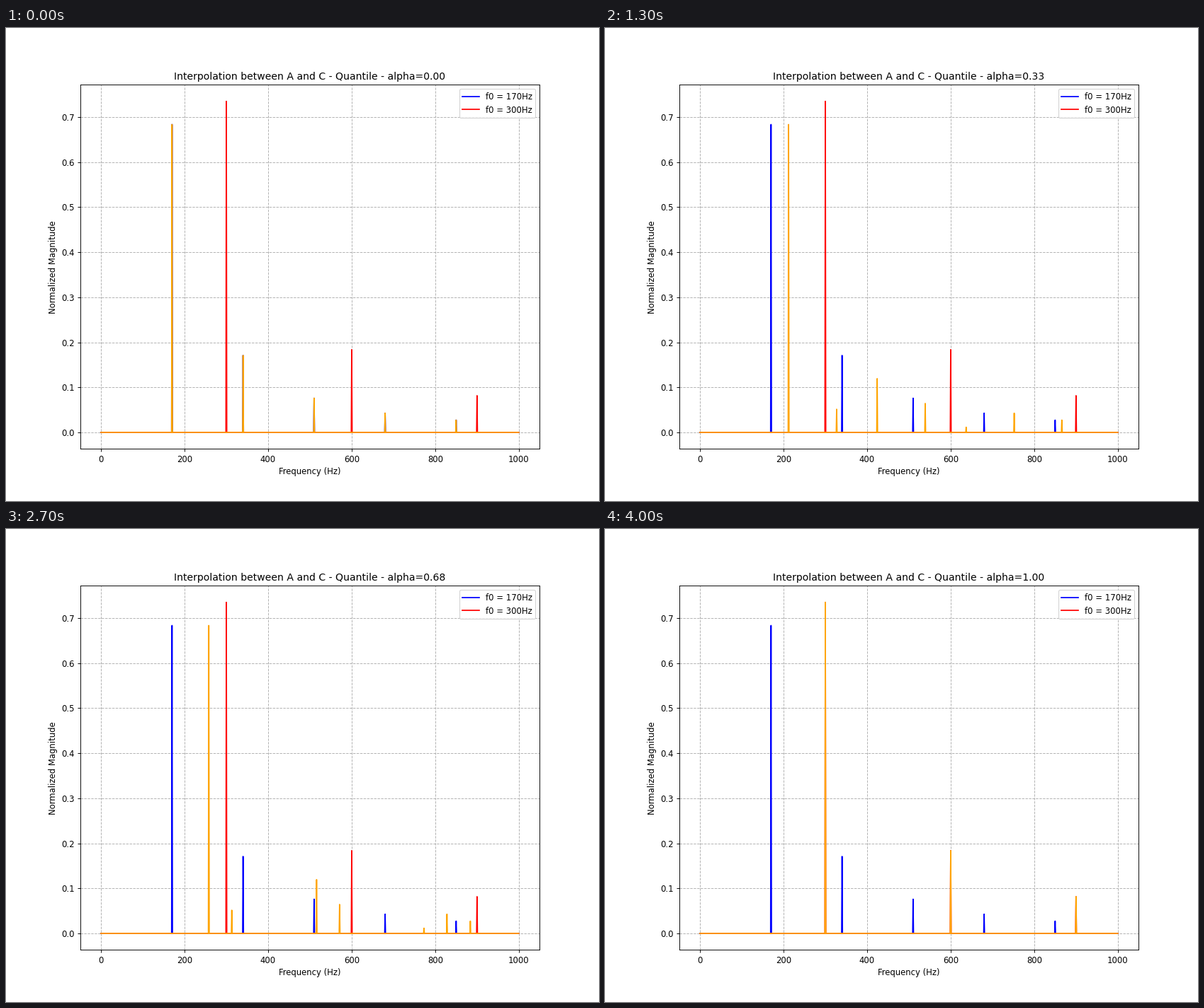
A matplotlib script that plays this animation: 837x669 px, repeating every 4100 ms.

```python
import numpy as np
import matplotlib.pyplot as plt
from matplotlib.animation import FuncAnimation

FRAMES = 41
INTERVAL = 100
WIDTH, HEIGHT, DPI = 837, 669, 83.7
F_MAX = 1000

freqs = np.arange(F_MAX + 1)


def harmonics(f0):
    """Harmonic frequencies up to F_MAX with normalized 1/k^2 weights."""
    k = np.arange(1, F_MAX // f0 + 1)
    weights = 1 / k**2
    return k * f0, weights / weights.sum()


def spectrum(positions, masses):
    values = np.zeros(len(freqs))
    np.add.at(values, np.rint(positions).astype(int), masses)
    return values


def quantile_plan(xa, wa, xb, wb):
    """Match the two spectra by their cumulative masses."""
    i = j = 0
    left_a, left_b = wa[0], wb[0]
    plan = []
    while True:
        mass = min(left_a, left_b)
        plan.append((xa[i], xb[j], mass))
        left_a -= mass
        left_b -= mass
        if left_a < 1e-12:
            i += 1
            if i == len(xa):
                break
            left_a = wa[i]
        if left_b < 1e-12:
            j += 1
            if j == len(xb):
                break
            left_b = wb[j]
    return np.array(plan).T


low = harmonics(170)
high = harmonics(300)
start, end, mass = quantile_plan(*low, *high)

# The tiny surplus keeps the canvas from truncating to one pixel less.
fig, ax = plt.subplots(
    figsize=((WIDTH + 1e-4) / DPI, (HEIGHT + 1e-4) / DPI), dpi=DPI
)
ax.plot(freqs, spectrum(*low), color="blue", label="f0 = 170Hz")
ax.plot(freqs, spectrum(*high), color="red", label="f0 = 300Hz")
moving, = ax.plot(freqs, spectrum(start, mass), color="orange")
ax.set_xlabel("Frequency (Hz)")
ax.set_ylabel("Normalized Magnitude")
ax.grid(True, linestyle="--")
ax.legend(loc="upper right")
title = ax.set_title("")


def update(frame):
    alpha = frame / (FRAMES - 1)
    moving.set_ydata(spectrum((1 - alpha) * start + alpha * end, mass))
    title.set_text(f"Interpolation between A and C - Quantile - alpha={alpha:.2f}")
    return moving, title


update(0)
anim = FuncAnimation(
    fig, update, frames=FRAMES, interval=INTERVAL, repeat=True, repeat_delay=0
)
plt.show()
```
